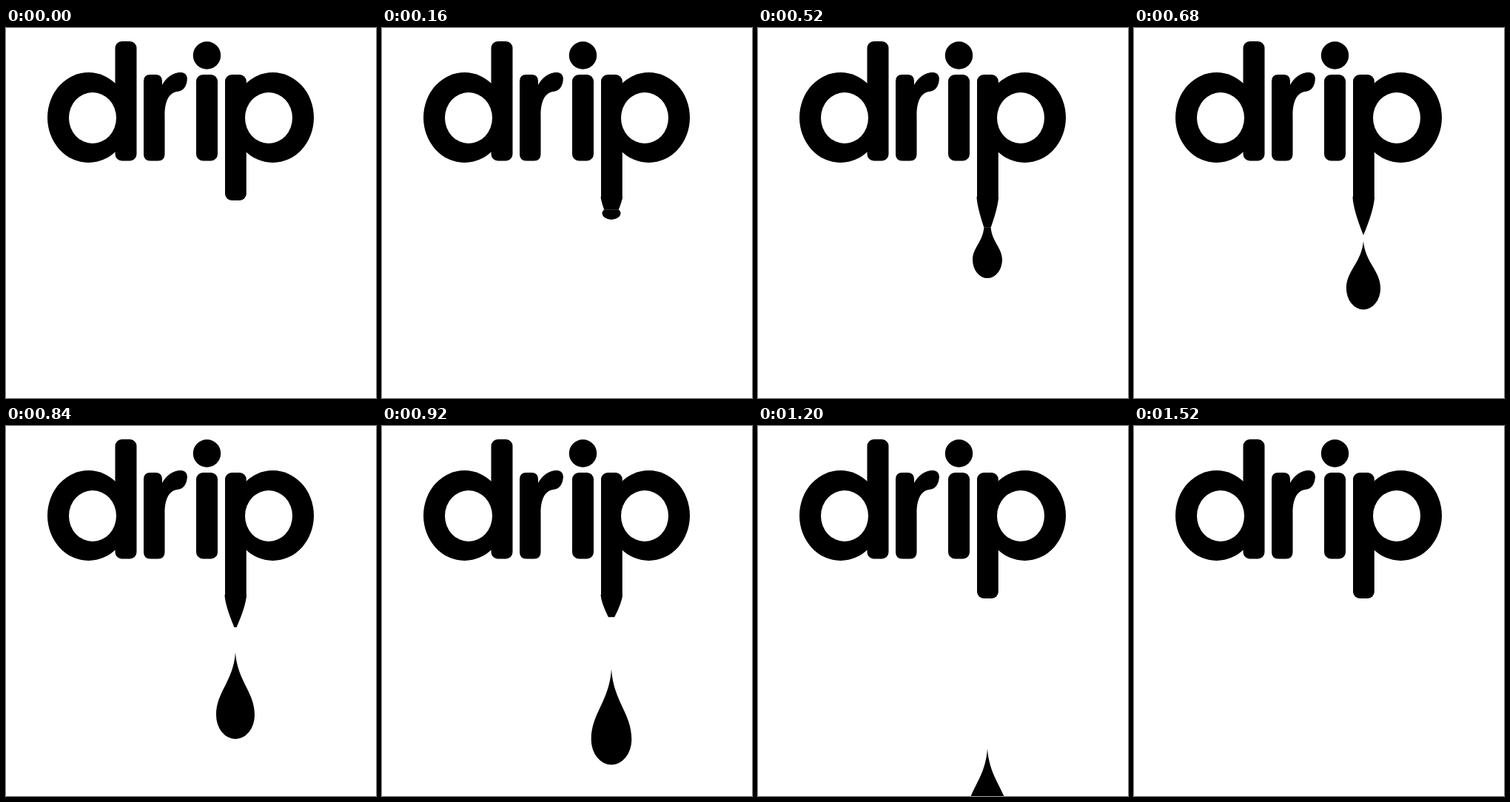
These frames come from a looping animation (500 by 500 pixels, 1.72 s). An HTML page:

```html
<!DOCTYPE html>
<html lang="en">
<head>
<meta charset="utf-8">
<title>drip</title>
<style>
  html, body { margin: 0; width: 100%; height: 100%; overflow: hidden; background: #fff; }
  svg { display: block; width: 100vw; height: 100vh; }
  .hole { fill: #fff; }
</style>
</head>
<body>
<svg viewBox="0 0 500 500" role="img" aria-label="drip">
  <!-- d -->
  <rect x="147.5" y="18" width="29" height="161.5" rx="9"/>
  <ellipse cx="111.5" cy="121" rx="55.5" ry="61"/>
  <ellipse class="hole" cx="117" cy="121.5" rx="32" ry="34.5"/>
  <!-- r -->
  <path d="M195 63H202Q211 63 211 72V77C216 67 226 60 236 60C243 60 246 65 244.5 72C243 81 239 85 231 86C219 88 214.5 101 214.5 118V170.5Q214.5 179.5 205.5 179.5H195Q186 179.5 186 170.5V72Q186 63 195 63Z"/>
  <!-- i -->
  <circle cx="271.5" cy="37" r="18.7"/>
  <rect x="257" y="63" width="29" height="116.5" rx="9"/>
  <!-- p -->
  <rect id="stem" x="296" y="63" width="28.8" height="170" rx="9"/>
  <ellipse cx="360.5" cy="121" rx="55.5" ry="61"/>
  <ellipse class="hole" cx="355" cy="121.5" rx="32" ry="34.5"/>
  <path id="taper"/>
  <path id="drop"/>
</svg>
<script>
const LOOP = 1720, STEP = 40, LAST = 1520, DETACH = 620;
const CX = 310, STEM_END = 233, STRETCH = 47;
const [stem, taper, drop] = ['stem', 'taper', 'drop'].map(id => document.getElementById(id));

// Lowest point of the drop: swells, hangs at a steady speed, then falls.
const fall = [[0, 233], [320, 285], [840, 423], [1040, 510], [LAST, 678]];

function along(points, t) {
  const i = Math.max(1, points.findIndex(p => p[0] >= t));
  const [[t0, v0], [t1, v1]] = [points[i - 1], points[i]];
  return v0 + (v1 - v0) * (t - t0) / (t1 - t0);
}

const clamp = u => Math.min(1, Math.max(0, u));

function smooth(from, to, t) {
  const u = clamp((t - from) / (to - from));
  return u * u * (3 - 2 * u);
}

// Tapered end of the stem, from full width down to the neck.
function taperPath(y, neck) {
  const top = 228, bend = top + (y - top) * 0.33;
  if (y <= STEM_END) return '';
  return `M295.5 ${top}Q296 ${bend} ${CX - neck} ${y}H${CX + neck}Q324.5 ${bend} 325 ${top}Z`;
}

function dropPath(top, bottom, w, neck) {
  const h = bottom - top, mid = Math.max(top + h / 3, bottom - w * 1.25);
  const side = s => [CX + s * (neck + w * 0.1), top + (mid - top) * 0.46];
  const wide = s => [CX + s * w, mid - (mid - top) * 0.37];
  return `M${CX + neck} ${top}C${side(1)} ${wide(1)} ${CX + w} ${mid}` +
    `A${w} ${bottom - mid} 0 0 1 ${CX - w} ${mid}` +
    `C${wide(-1)} ${side(-1)} ${CX - neck} ${top}Z`;
}

function draw(now) {
  const t = Math.min(LAST, Math.floor(now % LOOP / STEP) * STEP);
  const bottom = along(fall, t);
  const top = bottom - Math.min(130, Math.max(0, 0.152 * (t - 70)));
  const width = 29 - 20 * (1 - clamp(t / 1040)) ** 1.15;
  const neck = 0.46 * Math.sqrt(Math.max(0, DETACH - t));
  const retract = smooth(740, 1120, t);
  const end = Math.min(top, STEM_END + STRETCH * (1 - retract));

  stem.setAttribute('height', Math.min(end, 238) - 63);
  taper.setAttribute('d', taperPath(end, neck + 9 * retract));
  drop.setAttribute('d', dropPath(top, bottom, width, neck));
}

const start = performance.now();
function tick() {
  draw(performance.now() - start);
  requestAnimationFrame(tick);
}
tick();
</script>
</body>
</html>
```
